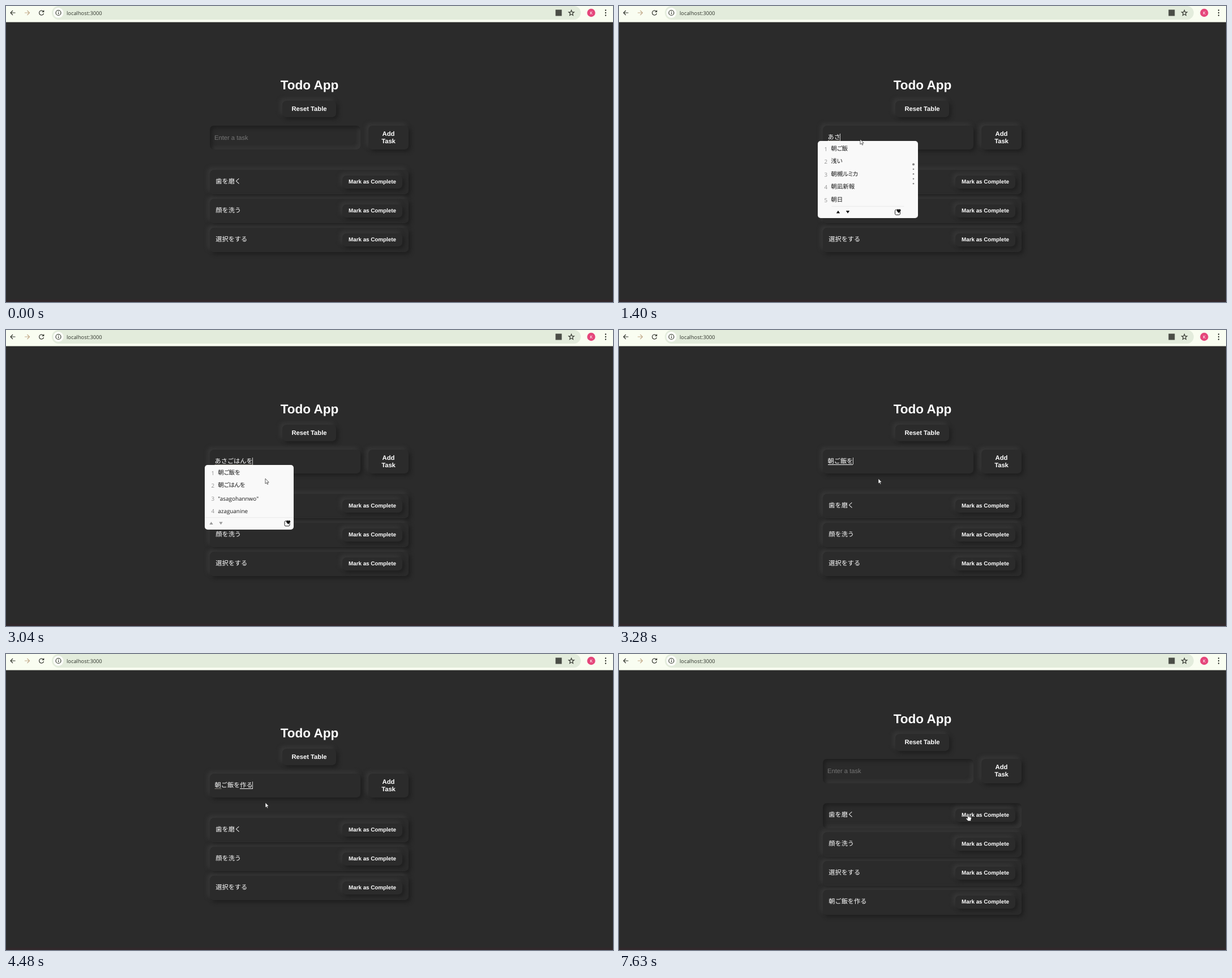
An HTML page that plays this animation: 1072 by 522 pixels, repeating every 8 s.

```html
<!DOCTYPE html>
<html lang="ja">
<head>
<meta charset="utf-8">
<title>Todo App</title>
<style>
html, body { margin: 0; width: 100%; height: 100%; overflow: hidden; background: #2b2b2b; }
body {
  position: relative; color: #fff; text-rendering: geometricPrecision;
  font: 11.2px/12.8px 'Liberation Sans', 'Noto Sans CJK JP', 'Noto Sans CJK', sans-serif;
  --out: 3.5px 3.5px 7px #1e1e1e, -3.5px -3.5px 7px #3a3a3a;
  --in: inset 3.5px 3.5px 7px #1e1e1e, inset -3.5px -3.5px 7px #3a3a3a;
}
body *, svg { position: absolute; box-sizing: border-box; }
svg * { position: static; }
#bar { left: 0; top: 0; }
#url { left: 107px; top: 4.6px; line-height: 16px; font-family: 'Open Sans', sans-serif; font-size: 9.3px; color: #30352c; }
#strip { left: 0; right: 0; top: 518px; height: 4px; background: #31282b; }
#app { left: 0; top: 0; width: 1072px; height: 500px; }
h1 { left: 436px; width: 200px; top: 126.4px; margin: 0; font-size: 22.5px; line-height: 28px; text-align: center; }
.box { border-radius: 7px; background: #2b2b2b; box-shadow: var(--out); }
.box.in { box-shadow: var(--in); }
.btn { display: flex; align-items: center; justify-content: center; text-align: center; font-weight: bold; padding-top: 2px; }
.task { left: 360px; width: 351px; height: 43.5px; }
.task span { left: 10.3px; top: 15.2px; white-space: nowrap; }
.task .btn { left: 234px; top: 10.2px; width: 106px; height: 23px; font-size: 9.8px; }
#text { left: 8.5px; top: 15px; white-space: nowrap; }
#hint { left: 8px; top: 16px; color: #757575; white-space: nowrap; }
#caret { top: 14.5px; width: 1px; height: 12px; background: #ccc; }
.line { top: 26.5px; height: 0; border-bottom: 1px dotted #cfcab8; }
.line.solid { border-bottom: 1px solid #f4f4f4; }
#ime { top: 238px; border-radius: 5px; background: #f9f9f9; color: #1b1b1b; overflow: hidden; }
#ime p { left: 0; margin: 0; height: 22.5px; line-height: 22.5px; white-space: nowrap;
  font-family: 'Open Sans', 'Noto Sans CJK JP', 'Noto Sans CJK', sans-serif; font-size: 10.5px; font-feature-settings: 'palt'; }
#ime p.latin { font-size: 9.9px; }
#ime i { left: 11.5px; font-style: normal; font-size: 9.9px; color: #929292; }
#ime b { left: 23.3px; font-weight: normal; }
#ime s { position: static; text-decoration: none; letter-spacing: -.6px; }
#ime svg { left: 0; top: 0; }
#click { width: 17px; height: 17px; border-radius: 50%; background: rgba(190, 180, 10, .78); }
#mouse { left: 0; top: 0; overflow: visible; }
</style>
</head>
<body>
<svg id="bar" width="1072" height="29" fill="none" stroke="#33362f" stroke-width="1.2">
  <rect width="1072" height="28.5" fill="#f9fdf1" stroke="none"/>
  <rect x="81" width="934" height="24" rx="12" fill="#e3ecdc" stroke="none"/>
  <path d="M16.5 12H8M12 8l-4 4 4 4"/>
  <path stroke="#c3ab8c" d="M33 12h8.500M37.500 8l4 4-4 4"/>
  <path d="M66.200 10.200A4 4 0 1 0 66.500 13M66.700 7.500v3h-3"/>
  <circle cx="92.500" cy="12" r="9" fill="#fdfffa" stroke="none"/>
  <circle cx="92.500" cy="12" r="4.500"/>
  <path d="M92.500 11.400v3M92.500 9.200v1.200"/>
  <rect x="970.500" y="6.500" width="11" height="11" fill="#4a4d46" stroke="none"/>
  <path id="star"/>
  <circle cx="1033.500" cy="12" r="7.200" fill="#e5467b" stroke="none"/>
  <text x="1033.500" y="14.600" fill="#fff" stroke="none" font-family="Roboto, sans-serif" font-size="7.500" text-anchor="middle">K</text>
  <path d="M1059 7.500h0M1059 12h0M1059 16.500h0" stroke-width="2.400" stroke-linecap="round"/>
</svg>
<div id="url">localhost:3000</div>
<div id="strip"></div>
<div id="app">
  <h1>Todo App</h1>
  <div class="box btn" style="left:488px;top:166.500px;width:95px;height:29.500px">Reset Table</div>
  <div class="box" id="field" style="left:360px;top:210.500px;width:266px;height:42.500px">
    <div id="hint">Enter a task</div><div id="text"></div>
    <div class="line" id="old"></div><div class="line" id="under"></div><div id="caret"></div>
  </div>
  <div class="box btn" id="add" style="left:640px;top:210.500px;width:71px;height:42.500px">Add<br>Task</div>
</div>
<div id="ime"></div>
<div id="click"></div>
<svg id="mouse" width="12" height="14" fill="#fff" stroke="#222" stroke-width=".7"><path/></svg>
<script>
const $ = id => document.getElementById(id);
const EM = 11.2, LOOP = 8000, FRAME = 108;
const FOCUS = 640, PRESS = 6110, ADDED = 6210;

// Candidate lists: left edge, width, footer inset, rows
const pop = (x, w, inset, ...rows) => ({ x, w, inset, rows });
const asa = ['朝ご飯', '浅い', '朝槻ルミカ', '朝凪新報', '朝日'];
const asag = ['朝ご飯', '朝ごはん', '朝顔', '朝方', '浅黒い'];
const asagoha = ['朝ご飯', '朝ごはん', '朝ご飯を', '朝ご飯は', '朝ごはんを食べる'];
const tsuku = ['作る', '使う', '通じて', '使って', '疲れ様です'];
const tsukuru = ['作る', '作るため', '造る', '創る', 'つくる'];
const first = pop(351, 236, 0, 'ありがとうございます', 'あと', '明日', 'ある', '朝');
const g = pop(351, 157, 0, ...asag);
const ha = pop(351, 157, 0, ...asagoha);
const wo = pop(351, 157, 0, '朝ご飯を', '朝ごはんを', '"asagohannwo"', 'azaguanine');
const ru = pop(396, 117, 0, ...tsukuru);

// time, text, first underlined character, solid underline, candidates
const typing = [
  [0, '', 0, 0, null],
  [1180, 'あ', 0, 0, first],
  [1290, 'あｓ', 0, 0, first],
  [1400, 'あさ', 0, 0, pop(351, 177, 24.5, ...asa)],
  [1510, 'あさｇ', 0, 0, g],
  [1830, 'あさご', 0, 0, g],
  [2160, 'あさごｈ', 0, 0, g],
  [2280, 'あさごは', 0, 0, ha],
  [2490, 'あさごはｎ', 0, 0, ha],
  [2600, 'あさごはん', 0, 0, ha],
  [2820, 'あさごはんｗ', 0, 0, ha],
  [3040, 'あさごはんを', 0, 0, wo],
  [3280, '朝ご飯を', 0, 1, null],
  [3510, '朝ご飯をｔ', 4, 0, null],
  [3600, '朝ご飯をつ', 4, 0, pop(396, 138, 0, '使う', '作る', '次の', '付ける', '疲れました')],
  [3710, '朝ご飯をつｋ', 4, 0, pop(396, 131, 0, ...tsuku)],
  [3820, '朝ご飯をつく', 4, 0, pop(396, 131, 0, ...tsuku)],
  [3930, '朝ご飯をつくｒ', 4, 0, ru],
  [4150, '朝ご飯をつくる', 4, 0, ru],
  [4480, '朝ご飯を作る', 4, 1, null],
  [4800, '朝ご飯を作る', 6, 0, null],
  [ADDED, '', 0, 0, null],
];

// start time, steps, from, to
const moves = [
  [100, 7, [745, 422], [426, 235]],
  [1830, 2, [426, 235], [458, 262]],
  [5230, 7, [458, 262], [690.5, 230.5]],
  [6980, 7, [690.5, 230.5], [616.5, 282.5]],
];

const shapes = {
  arrow: 'M0 0V9L2.1 7.2 3.600 10.200 4.900 9.600 3.500 6.600H6.200Z',
  hand: 'M-1 .8a1 1 0 0 1 2 0V4.500l4 .9a1.200 1.200 0 0 1 .9 1.300L5 10.500V12H0L-3.500 8a.9.9 0 0 1 1.400-1L-1 7.900Z',
  beam: 'M-2 -5H2M0 -5V5M-2 5H2',
};

const tasks = ['歯を磨く', '顔を洗う', '選択をする', '朝ご飯を作る'].map((name, i) => {
  const el = document.createElement('div');
  el.className = 'box task';
  el.style.top = 288.5 + 51 * i + 'px';
  el.innerHTML = `<span>${name}</span><div class="box btn">Mark as Complete</div>`;
  $('app').append(el);
  return el;
});

$('star').setAttribute('d', 'M' + Array.from({ length: 10 }, (_, i) => {
  const r = i % 2 ? 2.2 : 5, a = i * Math.PI / 5;
  return [998.5 + r * Math.sin(a), 12.4 - r * Math.cos(a)].map(v => v.toFixed(2));
}).join('L') + 'Z');

function drawIme({ x, w, inset, rows }) {
  const bottom = 2.75 + 22.5 * rows.length, mid = bottom + 10;
  const full = rows.length > 4, ink = full ? '#111' : '#999';
  const l = inset + 11.5, r = w - inset - 11.5;
  const list = rows.map((row, i) => {
    const label = row.replace(/[ぁ-ヿ]+/g, '<s>$&</s>');
    const latin = /[a-z]/.test(row) ? 'latin' : '';
    return `<p class="${latin}" style="top:${2.75 + 22.5 * i}px"><i>${i + 1}</i><b>${label}</b></p>`;
  }).join('');
  const dots = full ? [0, 1, 2, 3, 4].map(i =>
    `<circle cx="${w - 8}" cy="${41.2 + 8.5 * i}" r="${i ? 1.3 : 2}" fill="#858585"/>`).join('') : '';
  const tri = (cx, s) => `<path fill="${ink}" d="M${cx - 3.2} ${mid + 2.3 * s}h6.400l-3.200 ${-4.8 * s}z"/>`;
  $('ime').innerHTML = list + `<svg width="${w}" height="${bottom + 21}">
    <path d="M${inset} ${bottom}H${w - inset}" stroke="#e9e9e9"/>${dots}${tri(l, 1)}${tri(l + 17, -1)}
    <rect x="${r - 4.5}" y="${mid - 4}" width="9" height="9" rx="2" fill="none" stroke="#222"/>
    <path fill="#111" stroke="#f9f9f9" stroke-width=".5" d="M${r + 2} ${mid + 2.2}l-3.600-4a2.200 2.200 0 0 1 3.600-2.500a2.200 2.200 0 0 1 3.600 2.500z"/></svg>`;
  Object.assign($('ime').style, { left: x + 'px', width: w + 'px', height: bottom + 20.75 + 'px' });
}

function mouseAt(t) {
  let pos = null;
  for (const [start, steps, a, b] of moves) {
    if (t < start) break;
    const p = Math.min(1, (Math.floor((t - start) / FRAME) + 1) / steps);
    const e = p * p * (3 - 2 * p);
    pos = a.map((v, i) => v + (b[i] - v) * e);
  }
  return pos;
}

const inside = ([x, y], l, t, r, b) => x >= l && x <= r && y >= t && y <= b;
const show = (el, on) => { el.style.display = on ? '' : 'none'; };

function line(el, from, to) {
  show(el, to > from);
  el.style.left = 8.5 + EM * from + 'px';
  el.style.width = EM * (to - from) + 'px';
}

let shown = null;
function render(now) {
  const t = now % LOOP;
  const [, text, from, solid, ime] = typing.filter(s => s[0] <= t).pop();
  const focused = t >= FOCUS && t < PRESS, added = t >= ADDED;
  const lift = added ? 25.5 : 0;
  const pos = mouseAt(t);

  $('app').style.top = -lift + 'px';
  $('field').classList.toggle('in', !focused);
  $('text').textContent = text;
  show($('hint'), !text);
  show($('caret'), focused);
  $('caret').style.left = 8 + EM * text.length + 'px';
  line($('under'), from, focused ? text.length : 0);
  $('under').classList.toggle('solid', !!solid);
  line($('old'), 0, focused && from ? 1 : 0);

  show($('ime'), ime);
  if (ime && ime !== shown) drawIme(shown = ime);

  const overAdd = pos && !added && inside(pos, 640, 210, 711, 253);
  $('add').classList.toggle('in', !!overAdd);
  let pointer = overAdd || (added && t < 6980);
  tasks.forEach((el, i) => {
    const y = 288.5 - lift + 51 * i;
    show(el, i < 3 || added);
    const over = pos && !ime && inside(pos, 360, y, 711, y + 43.5);
    el.classList.toggle('in', !!over);
    if (over && inside(pos, 594, y + 10, 700, y + 33)) pointer = true;
  });

  show($('mouse'), pos);
  if (pos) {
    const overText = !ime && !added && inside(pos, 360, 210, 626, 253);
    const kind = pointer ? 'hand' : overText ? 'beam' : 'arrow';
    const path = $('mouse').firstChild;
    path.setAttribute('d', shapes[kind]);
    path.setAttribute('stroke', kind === 'beam' ? '#ddd' : '#222');
    $('mouse').style.transform = `translate(${pos[0]}px, ${pos[1]}px)`;
    $('click').style.transform = `translate(${pos[0] - 7.5}px, ${pos[1] - 8}px)`;
  }
  show($('click'), (t >= FOCUS && t < FOCUS + 100) || (t >= PRESS && t < ADDED));
}

const begin = performance.now();
function tick() {
  render(performance.now() - begin);
  requestAnimationFrame(tick);
}
tick();
</script>
</body>
</html>
```
